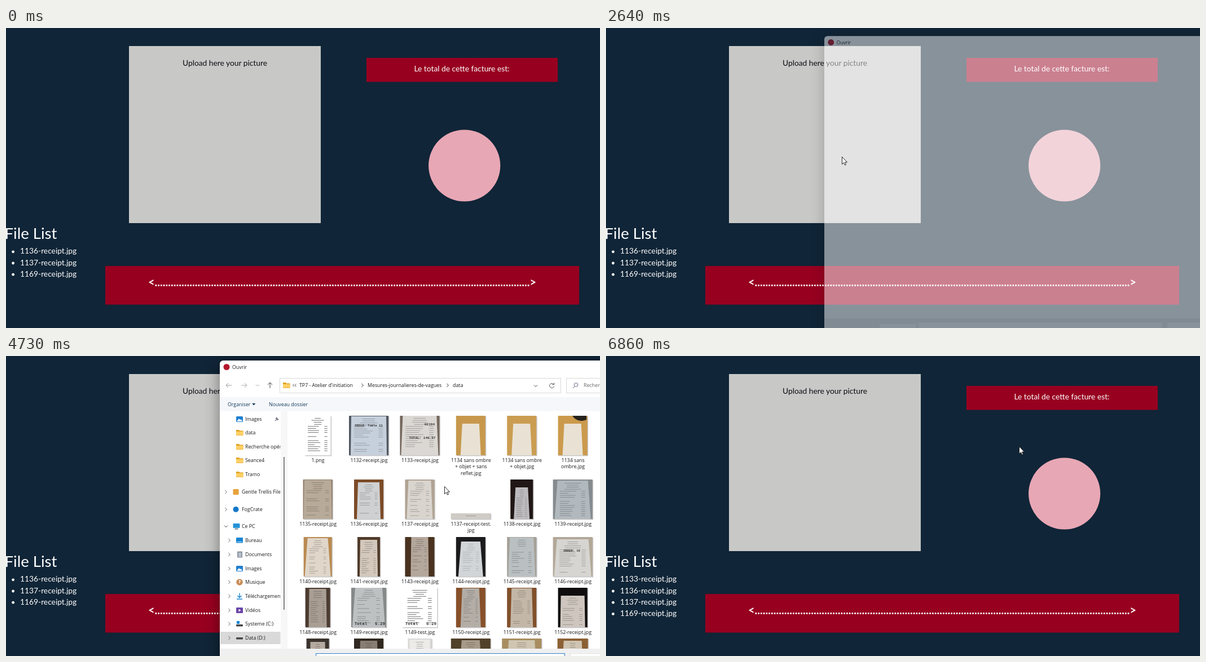
These frames come from a looping animation (1053 by 532 pixels, 8000 ms). An HTML page:

```html
<!DOCTYPE html>
<html lang="fr">
<head>
<meta charset="utf-8">
<title>Receipt upload</title>
<style>
html, body { margin: 0; width: 100%; height: 100%; overflow: hidden; background: #102537; }
svg { display: block; width: 100%; height: 100%; }
text { white-space: pre; }
.page { font-family: Lato, sans-serif; }
.win { font-family: "Open Sans", "Noto Sans", sans-serif; }
.mono { font-family: "Liberation Mono", monospace; }
#dialog { transform-origin: 780px 315px; }
#frame { filter: drop-shadow(0 5px 13px rgba(0, 0, 0, .42)); }
#tip { filter: drop-shadow(1px 1px 1px rgba(0, 0, 0, .3)); }
</style>
</head>
<body>
<svg id="stage" viewBox="0 0 1053 532" xmlns="http://www.w3.org/2000/svg"></svg>
<script>
const LOOP = 8000;
const stage = document.getElementById('stage');

// Markup helpers
const rect = (x, y, w, h, fill, extra = '') =>
  `<rect x="${x}" y="${y}" width="${w}" height="${h}" fill="${fill}" ${extra}/>`;
const disc = (x, y, r, fill) => `<circle cx="${x}" cy="${y}" r="${r}" fill="${fill}"/>`;
const line = (d, color = '#555', w = 1) =>
  `<path d="${d}" fill="none" stroke="${color}" stroke-width="${w}"/>`;
const shape = (d, fill) => `<path d="${d}" fill="${fill}"/>`;
const text = (x, y, s, size = 8.8, fill = '#1b1b1b', extra = '') =>
  `<text x="${x}" y="${y}" font-size="${size}" fill="${fill}" ${extra}>${s}</text>`;
const group = (id, body, extra = '') => `<g id="${id}" ${extra}>${body}</g>`;
const mid = 'text-anchor="middle"';

let seed = 7;
const rnd = () => (seed = (seed * 16807) % 2147483647) / 2147483647;

// Web page
function dotLine() {
  const ctx = document.createElement('canvas').getContext('2d');
  ctx.font = 'bold 20px Lato, sans-serif';
  const w = s => ctx.measureText(s).width;
  const n = Math.round((690 - 2 * w('<')) / w('.'));
  return '&lt;' + '.'.repeat(n) + '&gt;';
}

function fileList(id, names) {
  return group(id, names.map((n, i) => {
    const y = 400.4 + i * 20.2;
    return disc(12.6, y - 3.6, 2.4, '#fff') + text(25, y, n + '-receipt.jpg', 13.8, '#fff');
  }).join(''));
}

const page = group('page',
  rect(0, 0, 1053, 532, '#102537') +
  rect(218, 32, 340, 314, '#c8c8c7') +
  text(388, 67, 'Upload here your picture', 13.8, '#0b0b14', mid) +
  rect(639, 53, 339, 42.5, '#980020') +
  text(808, 77, 'Le total de cette facture est:', 13.8, '#fff', mid) +
  disc(812.7, 244, 63.6, '#e8a7b5') +
  rect(176, 422, 840, 68.5, '#980020') +
  text(596, 458, dotLine(), 20, '#fff', mid + ' font-weight="bold"') +
  text(-2.5, 373.6, 'File List', 27.6, '#fff') +
  fileList('before', [1136, 1137, 1169]) +
  fileList('after', [1133, 1136, 1137, 1169]), 'class="page"');

// Dialog chrome
const folder = (x, y) =>
  shape(`M${x} ${y - 5}h5l1.5 1.5h6v8.500h-12.500z`, '#e0a526') +
  rect(x, y - 2, 12.5, 6.5, '#ffd065', 'rx="1"');
const chevron = (x, y, c = '#666') => line(`M${x - 1.7} ${y - 3}l3.2 3l-3.2 3`, c);
const down = (x, y, c = '#444') => line(`M${x - 3} ${y - 1.5}l3 3l3-3`, c);

const frame =
  group('frame', rect(379, 8, 803, 605, '#fff', 'rx="6"')) +
  disc(391, 19.5, 5.5, '#b3182d') +
  text(401, 23, 'Ouvrir') +
  rect(379, 519, 803, 90, '#f0f0f0') +
  group('blank', rect(479, 529, 66, 30, '#fff')) +
  rect(549, 526.5, 441, 30, '#fff') +
  rect(1000, 526.5, 170, 30, '#fff');

const chrome = group('chrome',
  line('M400 52h-10m4-4l-4 4l4 4', '#999') +
  line('M417 52h10m-4-4l4 4l-4 4', '#aaa') +
  down(446, 52, '#aaa') +
  line('M468 57v-10m-4 4l4-4l4 4', '#444') +
  rect(485.5, 39.5, 498, 26, '#fff', 'stroke="#d9d9d9"') +
  folder(491, 52) +
  line('M511 49.500l-2.500 2.500l2.500 2.500M514.500 49.500l-2.500 2.500l2.500 2.500', '#555') +
  text(520, 55, "TP7 - Atelier d'initiation") + chevron(632, 52, '#333') +
  text(641, 55, 'Mesures-journalieres-de-vagues') + chevron(783, 52, '#333') +
  text(792, 55, 'data') + down(939, 53) +
  line('M971 50.500a4 4 0 1 0 .5 3M971.500 47.500v3.200h-3.200', '#555') +
  rect(993.5, 39.5, 180, 26, '#fff', 'stroke="#d9d9d9"') +
  line('M1005 57l3.500-3.500', '#668') +
  '<circle cx="1010.500" cy="51" r="3.300" fill="none" stroke="#668"/>' +
  text(1024, 55, 'Rechercher', 8.8, '#666') +
  rect(379, 73, 803, 24.5, '#f5f7fa') +
  text(393, 89, 'Organiser', 8.8, '#123a5c') + shape('M436 84h6.500l-3.250 3.500z', '#123a5c') +
  text(466, 89, 'Nouveau dossier', 8.8, '#123a5c') +
  rect(549.5, 527.5, 441, 40, '#fff', 'stroke="#2b7cc4"') +
  rect(1000.5, 527.5, 170, 40, '#fdfdfd', 'stroke="#ddd"'));

// Sidebar
const picture = (x, y) => rect(x, y - 5, 12, 10, '#1f7fd0', 'rx="1.500"') +
  shape(`M${x + 1} ${y + 4}l4-5l2 2.500l1.500-1.500l2.500 4z`, '#fff');
const icons = {
  folder, picture,
  brand: (x, y) => rect(x, y - 5, 10, 10, '#e8a33a', 'rx="1"'),
  cloud: (x, y) => disc(x + 5, y, 5, '#1477c9'),
  pc: (x, y) => rect(x, y - 5, 12, 8, '#2492d6', 'rx="1"') + rect(x + 3, y + 4, 6, 1.3, '#456'),
  desk: (x, y) => rect(x, y - 5, 12, 9.5, '#1684d2', 'rx="1"') + rect(x + 1.5, y + 2, 9, 1, '#bde3ff'),
  doc: (x, y) => rect(x + 2, y - 5.5, 9, 11, '#8a97a5', 'rx="1"') +
    line(`M${x + 4} ${y - 2}h5m-5 2.500h5m-5 2.500h5`, '#fff'),
  note: (x, y) => disc(x + 6, y, 5.8, '#c98c58') + line(`M${x + 6} ${y + 2}v-5l2 1.500`, '#fff', 1.2),
  load: (x, y) => line(`M${x + 6} ${y - 5.500}v7.500m-3.500-3l3.500 3.500l3.500-3.500M${x + 1} ${y + 5}h10`, '#1684d2', 1.4),
  film: (x, y) => rect(x, y - 5, 12, 10, '#6b45a8', 'rx="1"') + shape(`M${x + 4.5} ${y - 2.5}l4 2.500l-4 2.500z`, '#fff'),
  sys: (x, y) => rect(x, y + 1, 12, 3.5, '#444', 'rx="1"') + rect(x + 1, y - 5, 5, 5, '#1684d2'),
  disk: (x, y) => rect(x, y - 1, 12, 3.5, '#444', 'rx="1"')
};
const tree = [
  [112, 'picture', 'Images'], [136, 'folder', 'data'], [161, 'folder', 'Recherche opérationnelle'],
  [185, 'folder', 'Seance4'], [210, 'folder', 'Tramo'],
  [241, 'brand', 'Gentle Trellis Files', 1], [272, 'cloud', 'FogCrate', 1], [302, 'pc', 'Ce PC', 1],
  [327, 'desk', 'Bureau', 2], [352, 'doc', 'Documents', 2], [377, 'picture', 'Images', 2],
  [401, 'note', 'Musique', 2], [426, 'load', 'Téléchargements', 2], [451, 'film', 'Vidéos', 2],
  [475, 'sys', 'Systeme (C:)', 2], [500, 'disk', 'Data (D:)', 2]
];
const branch = ([y, icon, name, level]) => {
  const top = level === 1;
  const arrow = !level ? '' : icon === 'pc' ? down(390, y) : chevron(top ? 390 : 396, y);
  return arrow + icons[icon](top ? 402.5 : 408, y) + text(top ? 418 : 424, y + 3, name);
};
const sidebar = group('sidebar',
  '<clipPath id="sideClip"><rect x="379" y="97" width="107.500" height="422"/></clipPath>' +
  `<g clip-path="url(#sideClip)">${rect(380, 489, 107, 22, '#d9d9d9')}${tree.map(branch).join('')}</g>` +
  line('M477 115l3-3m-2-2l4 4m-3-5l4 4', '#778', 1.3) +
  rect(487, 98, 12, 421, '#f7f7f7') + rect(492, 179, 1.8, 271, '#777'));
const tip = group('tip', rect(401, 233, 100, 18, '#fff')) +
  group('tipText', icons.brand(402.5, 242) + text(418, 244, 'Gentle Trellis Files', 8.8, '#444'));

// Files: name, width, backdrop, paper, side margin, top margin, taper, ink strength
const tops = [106, 219, 321, 411, 501];
const jpg = n => n + '-receipt.jpg';
const files = [
  ['1.png', 46, '#fbfbfb', '#fff', 2, 0, 0, .7],
  [jpg(1132), 70, '#525861', '#c6d0dc', 3, 1, 1],
  [jpg(1133), 70, '#75685d', '#dbd7d3', 2, 0, 3],
  ['1134 sans ombre/+ objet + sans/reflet.jpg', 52, '#c7984c', '#e9e2d4', 8, 14, 3, 0],
  ['1134 sans ombre/+ objet.jpg', 52, '#cb9d52', '#e9e2d4', 8, 14, 3, 0],
  ['1134 sans/ombre.jpg', 52, '#cb9a4c', '#e9e2d4', 8, 14, 3, 0],
  [jpg(1135), 52, '#8c7965', '#b8aa99', 1, 1, 1],
  [jpg(1136), 52, '#7c4b27', '#cfd0d1', 5, 5, 2],
  [jpg(1137), 52, '#b0a393', '#d9d5ce', 3, 2, 3],
  ['1137-receipt-test./jpg', 70, '#aaa69f', '#cfcbc5', 0, 60, 0],
  [jpg(1138), 40, '#211717', '#bcbabd', 6, 14, 3],
  [jpg(1139), 70, '#858b8e', '#b2b9be', 3, 2, 5],
  [jpg(1140), 50, '#b98a50', '#e0d6c9', 2, 2, 5],
  [jpg(1141), 40, '#513b2a', '#d3c8bb', 4, 5, 1],
  [jpg(1143), 52, '#49321f', '#b4a79b', 10, 0, 1],
  [jpg(1144), 52, '#1b1b1d', '#d2d5d7', 4, 8, 5, .2],
  [jpg(1145), 52, '#a5a097', '#bac0c2', 2, 1, 3],
  [jpg(1146), 70, '#b2a898', '#d7d5d1', 2, 4, 5],
  [jpg(1148), 44, '#4c3b31', '#a99e94', 6, 2, 1],
  [jpg(1149), 62, '#858a89', '#bdc1c2', 2, 0, 5],
  ['1149-test.jpg', 62, '#fff', '#fff', 2, 0, 3, .7],
  [jpg(1150), 52, '#87502a', '#b3ada6', 8, 1, 3],
  [jpg(1151), 52, '#81502a', '#c3b7a7', 6, 1, 2],
  [jpg(1152), 52, '#0f0d0d', '#cec6be', 4, 14, 1],
  ['', 40, '#3b332d', '#b4aaa0', 6, 6, 1],
  ['', 52, '#302820', '#8a7e72', 9, 4, 2],
  ['', 42, '#d9d9d7', '#ecebe8', 3, 2, 0],
  ['', 70, '#51402a', '#a79a88', 14, 3, 5],
  ['', 70, '#a88d60', '#cfc5b1', 8, 3, 4],
  ['', 54, '#8b6134', '#cfc4b2', 8, 4, 3]
];

// A centred heading, then rows of item and price
function receipt(x, y, w, h) {
  let out = '';
  for (let r = 4; r < h - 5; r += 3.6) {
    const a = w * (.25 + rnd() * .3);
    if (r < 16) out += rect(x + (w - a) / 2, y + r, a, .9, '#222');
    else if (rnd() > .25) {
      out += rect(x + w * .08, y + r, a, .9, '#222') + rect(x + w * .78, y + r, w * .13, .9, '#222');
    }
  }
  return out;
}

function thumb([name, w, back, paper, side, top, taper, ink = .32], i) {
  const cx = 552.6 + (i % 6) * 90.4, y = tops[Math.floor(i / 6)];
  const x = cx - w / 2, py = y + top, pw = w - 2 * side, ph = 70 - top;
  const y0 = top === 60 ? py : y;
  const labels = name.split('/').map((s, k) => text(cx + .5, y + 81.5 + k * 11.6, s, 8.8, '#1b1b1b', mid));
  return rect(x + 1, y0 + 1, w + .5, y + 70 - y0 + .5, '#000', 'opacity=".22"') +
    rect(x, y0, w, y + 70 - y0, back) +
    shape(`M${x + side + taper} ${py}h${pw - 2 * taper}l${taper} ${ph}h${-pw}z`, paper) +
    `<g opacity="${ink}">${receipt(x + side + taper, py, pw - 2 * taper, ph)}</g>` + labels.join('');
}

const prints = [
  [643, 125, 'ORDER: Table 11', 5.5], [751, 123, 'H2194', 6], [738, 147, 'TOTAL: 146.57', 6],
  [1003, 347, 'ORDER: 10', 5.5], [629, 477, 'Total', 7.5], [663, 477, '5.29', 7.5],
  [719, 477, 'Total', 7.5], [754, 477, '5.29', 7.5]
].map(([x, y, s, size]) => text(x, y, s, size, '#333', mid + ' class="mono" font-weight="bold"')).join('');

const tile = (id, x, y, h, fill, edge) =>
  group(id, rect(x + .5, y + .5, 80, h, fill, `stroke="${edge}"`));
const tiles = tile('hoverTest', 784, 216, 101, '#e5f3ff', '#e5f3ff') +
  tile('hoverPick', 693.5, 103, 88, '#e5f3ff', '#e5f3ff') +
  tile('picked', 693.5, 103, 88, '#cce8ff', '#99d1ff');
const fileArea = group('files', '<clipPath id="fileClip"><rect x="499" y="98" width="560" height="421"/></clipPath>' +
  `<g clip-path="url(#fileClip)">${tiles}${files.map(thumb).join('')}${prints}` +
  shape('M1004 106q9 13 25 7v-7z', '#26221e') + '</g>');
const caret = group('caret', rect(552, 530, 1, 10, '#111'));

// Pointer
const pointer = group('pointer',
  group('click', disc(.5, .5, 9.5, '#ffe600')) +
  '<path d="M.5 .5v13l3-2.700l2 4.400l2-.9l-2-4.300h4z" fill="#fff" stroke="#111" stroke-width=".9"/>' +
  group('spinner', '<circle cx="11" cy=".8" r="4.700" fill="none" stroke="#2b8fe0" stroke-width="2.600"/>' +
    line('M11-3.900a4.700 4.700 0 0 1 4.700 4.700', '#7cc4f7', 2.6)));

stage.innerHTML = page +
  group('dialog', frame + chrome + fileArea + sidebar + tip + caret, 'class="win"') + pointer;

// Step tables: time, then values
const moves = [
  [0, -50, -50], [1170, 752, 502], [1300, 738, 478], [1430, 701, 440], [1560, 600, 352],
  [1690, 490, 268], [1820, 418, 228], [3170, 428, 234], [3300, 440, 240], [3430, 476, 234],
  [3560, 566, 214], [3690, 653, 202], [3820, 722, 212], [3950, 790, 240], [4210, 812, 262],
  [4340, 818, 267], [4470, 812, 260], [4600, 798, 246], [4730, 777, 231], [4860, 743, 184],
  [5010, 738, 171], [5140, 734, 164], [5270, 732, 160]
];
const clicks = [
  [0, 0], [1820, .7], [1960, .55], [2090, .4], [2220, .2], [2350, 0],
  [6070, .7], [6200, .3], [6330, .7], [6470, 0]
];
// Dialog: opacity, scale
const windowSteps = [
  [0, 0, 1], [2640, .5, .98], [2770, 1, .99], [2910, 1, .998], [3030, 1, 1],
  [6470, .5, .985], [6610, 0, 1]
];
const spans = {
  before: [0, 6860], after: [6860, LOOP], blank: [2640, 3170], chrome: [3170, 6610],
  sidebar: [3300, 6610], files: [3430, 6610], tip: [3430, 4210], tipText: [3430, 4210],
  hoverTest: [3950, 4730], hoverPick: [4860, 6070], picked: [6070, 6610], spinner: [2350, 2640]
};
const CARET_START = 3144, CARET_PHASE = 528;

const el = id => document.getElementById(id);
const at = (steps, t) => steps.reduce((last, s) => (s[0] <= t ? s : last));
const show = (id, on) => { el(id).style.display = on ? '' : 'none'; };

function draw(t) {
  for (const id in spans) show(id, t >= spans[id][0] && t < spans[id][1]);
  const [, x, y] = at(moves, t);
  el('pointer').setAttribute('transform', `translate(${x} ${y})`);
  el('click').style.opacity = at(clicks, t)[1];
  el('spinner').setAttribute('transform', `rotate(${t < 2500 ? 0 : 90} 11 .8)`);
  const [, alpha, scale] = at(windowSteps, t);
  show('dialog', alpha > 0);
  el('dialog').style.opacity = alpha;
  el('dialog').style.transform = `scale(${scale})`;
  show('caret', t >= CARET_START && Math.floor((t - CARET_START) / CARET_PHASE) % 2 === 0);
}

const start = performance.now();
function tick() {
  draw((performance.now() - start) % LOOP);
  requestAnimationFrame(tick);
}
tick();
</script>
</body>
</html>
```
